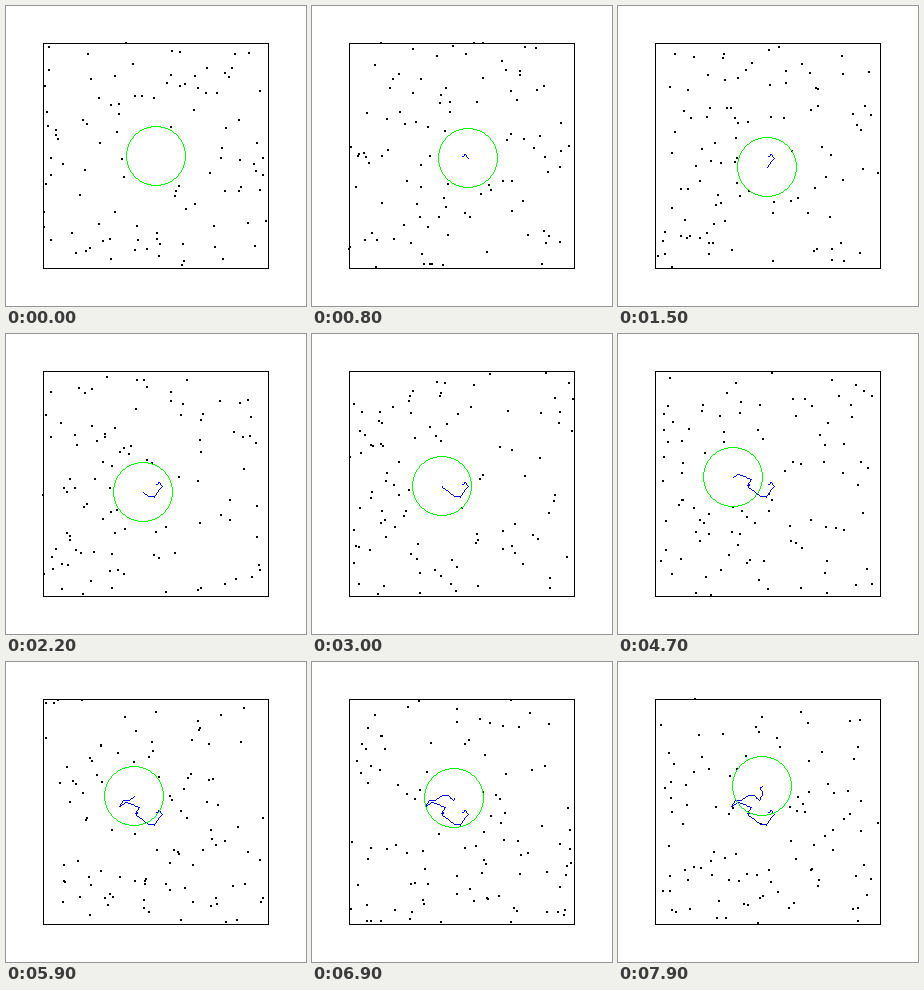
A matplotlib script for the animation above (8 s loop, 300x300 px).

```python
import numpy as np
import matplotlib.pyplot as plt
from matplotlib.animation import FuncAnimation
from matplotlib.collections import PolyCollection

SIZE, FRAMES, INTERVAL = 300, 80, 100
LOW, HIGH = 37, 262
RADIUS, COUNT, SPEED, SUBSTEPS = 30, 100, 4.0, 4

# Turning points of the wandering disc, evenly spaced in time
TURNS = np.array([
    150+150j, 153+148j, 156+152j, 152+156j, 148+163j, 141+161j, 133+155j,
    130+153j, 131+150j, 129+151j, 133+145j, 120+140j, 113+144j, 117+138j,
    122+138j, 130+133j, 136+133j, 141+138j, 144+132j, 142+125j, 145+124j,
])


def disc_at(step):
    times = np.linspace(0, FRAMES, len(TURNS))
    z = np.interp(step, times, TURNS)
    return np.array([z.real, z.imag])


def simulate(seed=7):
    """Particles bouncing off the walls and the moving disc."""
    rng = np.random.default_rng(seed)
    pos = rng.uniform(LOW, HIGH, (2 * COUNT, 2))
    clear = np.hypot(*(pos - disc_at(0)).T) > RADIUS + 1
    pos = pos[clear][:COUNT]
    vel = rng.normal(0, SPEED, pos.shape)
    history = [pos.copy()]
    dt = 1 / SUBSTEPS
    for k in range(1, (FRAMES - 1) * SUBSTEPS + 1):
        pos += vel * dt
        for limit, hit, sign in ((LOW, pos < LOW, 1), (HIGH, pos > HIGH, -1)):
            pos[hit] = 2 * limit - pos[hit]
            vel[hit] = sign * np.abs(vel[hit])

        center = disc_at(k * dt)
        drift = (center - disc_at((k - 1) * dt)) / dt
        offset = pos - center
        dist = np.hypot(*offset.T)
        normal = offset / dist[:, None]
        approach = np.sum((vel - drift) * normal, axis=1)
        inside = dist < RADIUS
        bounce = inside & (approach < 0)
        vel[bounce] -= 2 * approach[bounce, None] * normal[bounce]
        pos[inside] = center + normal[inside] * RADIUS
        if k % SUBSTEPS == 0:
            history.append(pos.copy())
    return history


def squares(corners, side=1):
    unit = side * np.array([(0, 0), (1, 0), (1, 1), (0, 1)])
    return np.asarray(corners)[:, None, :] + unit


def line(a, b):
    n = int(np.abs(b - a).max()) + 1
    return np.rint(np.linspace(a, b, n))


def polyline(points):
    points = np.rint(points)
    pixels = [line(a, b) for a, b in zip(points, points[1:])]
    return np.unique(np.vstack(pixels), axis=0) if pixels else points


def ring(radius):
    """Pixel offsets of a circle exactly 2 * radius pixels wide."""
    edge = radius - 0.5
    x = np.arange(0.5, edge / np.sqrt(2) + 0.5)
    y = np.floor(np.sqrt(edge ** 2 - x ** 2)) + 0.5
    octants = [(sx * p, sy * q) for p, q in ((x, y), (y, x))
               for sx in (1, -1) for sy in (1, -1)]
    return np.unique(np.hstack(octants).T - 0.5, axis=0)


fig = plt.figure(figsize=(SIZE / 100, SIZE / 100), dpi=100, facecolor="white")
ax = fig.add_axes([0, 0, 1, 1])
ax.set_xlim(0, SIZE)
ax.set_ylim(SIZE, 0)
ax.axis("off")


def layer(color, verts=()):
    shapes = PolyCollection(verts, facecolors=color, edgecolors="none",
                            linewidths=0, antialiaseds=False, snap=False)
    ax.add_collection(shapes, autolim=False)
    return shapes


box = [(LOW, LOW), (HIGH, LOW), (HIGH, HIGH), (LOW, HIGH), (LOW, LOW)]
layer("black", squares(polyline(box)))
dots = layer("black")
trail = layer("#0000ff")
disc = layer("#00ff00")

particles = simulate()
outline = ring(RADIUS)
route = [disc_at(step) for step in range(FRAMES)]


def draw(step):
    dots.set_verts(squares(np.floor(particles[step]) - 1, 2))
    disc.set_verts(squares(outline + np.rint(route[step])))
    trail.set_verts(squares(polyline(route[:step + 1])) if step else [])
    return dots, trail, disc


anim = FuncAnimation(fig, draw, frames=FRAMES, interval=INTERVAL,
                     repeat=True, repeat_delay=0, blit=False)
plt.show()
```
